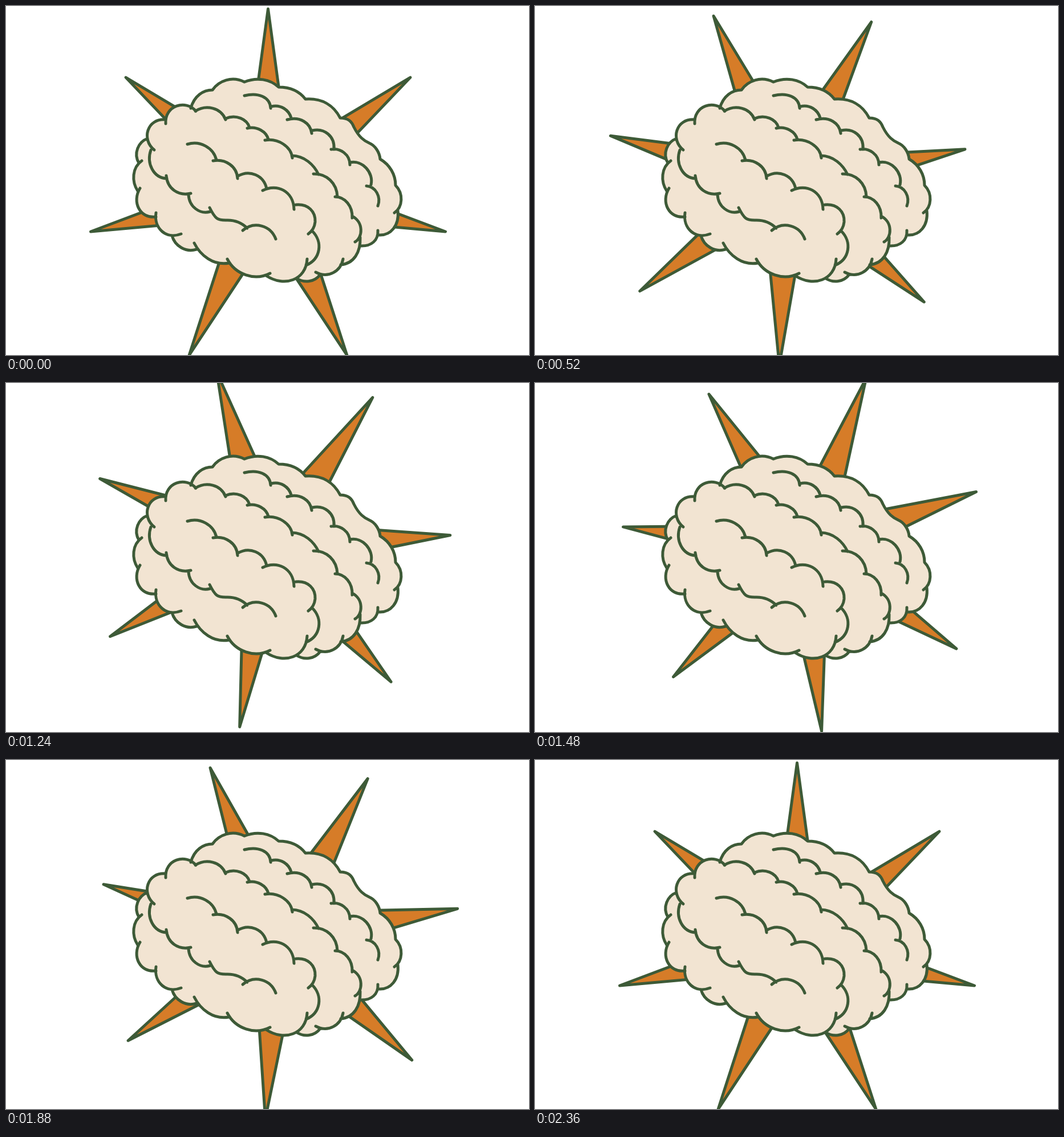
An HTML page with a canvas for the animation above (2.4 s loop, 917x611 px).

```html
<!DOCTYPE html>
<html lang="en">
<head>
<meta charset="utf-8">
<title>Brain with spinning star</title>
<style>
  html, body { margin: 0; width: 100%; height: 100%; overflow: hidden; background: #fff; }
  canvas { display: block; }
</style>
</head>
<body>
<canvas id="stage" width="917" height="611"></canvas>
<script>
const ctx = document.getElementById("stage").getContext("2d");
const WIDTH = 917, HEIGHT = 611;
const STEP = 40, STEPS = 60;
const GREEN = "#3d5a37", ORANGE = "#d67c28", CREAM = "#f2e4d2";

// The star's centre sits below the pivot, so it swings as it turns.
const PIVOT = { x: WIDTH / 2, y: HEIGHT / 2 };
const STAR = { x: 1, y: 18.5, points: 7, outer: 319, inner: 78 };

// Outer contour, clockwise; every M starts a new scallop.
const rightContour = `
  M324 179 C330 157 346 147 362 147 C373 131 396 122 418 133
  C440 124 463 128 478 142 C499 142 515 150 525 163
  C553 161 574 173 586 196 C600 196 606 202 610 212
  C619 230 628 236 637 240 C647 244 655 256 656 268
  C673 278 683 295 683 314 C697 328 696 352 681 362
  M687 358 C690 385 674 402 654 401
  M652 393 C653 410 641 421 621 420
  M621 405 C622 431 610 451 587 453
  M591 443 C587 464 565 478 543 466
  M551 470 C541 484 522 485 510 477`;
const leftContour = `
  M528 443 C526 480 488 493 456 472
  M463 468 C436 482 402 470 388 443
  M391 450 C364 455 341 437 330 415
  M334 426 C315 432 296 420 291 402
  M307 399 C281 409 259 390 263 362
  M263 369 C235 373 220 343 235 319
  M231 324 C220 307 221 283 238 271
  M233 275 C223 258 232 238 248 232
  M260 252 C237 234 247 196 280 199
  M280 206 C278 174 315 163 333 184`;

const folds = [
  `M418 157 C442 151 463 159 464 179
   M465 176 C482 172 496 182 500 196
   M493 199 C516 193 534 205 536 223
   M537 218 C558 213 577 228 575 251
   M570 251 C586 248 603 260 603 278
   M603 274 C625 269 645 292 640 313
   M632 315 C648 316 658 334 652 350`,
  `M332 184 C351 172 377 178 385 199
   M385 197 C403 189 423 198 427 213
   M423 214 C440 210 457 220 460 234
   M454 235 C477 231 500 246 502 266
   M501 262 C523 262 540 278 548 295
   M539 294 C562 293 580 310 581 334
   M577 334 C594 334 608 350 607 371
   M607 368 C627 378 626 405 612 413`,
  `M318 242 C340 235 364 248 369 270
   M363 271 C385 267 405 281 406 302
   M406 298 C427 286 452 296 457 320
   M450 323 C475 310 504 324 505 356
   M508 348 C530 346 543 360 542 378 C541 388 537 394 530 399
   M537 394 C556 413 552 443 526 454`,
  `M254 252 C246 275 258 301 282 302
   M281 297 C283 320 302 333 324 328
   M320 330 C321 352 340 365 358 360
   M357 353 C367 373 371 375 385 375 C403 374 414 380 423 389
   M415 393 C435 376 464 384 473 408`
];

const contour = rightContour + leftContour;
const brainShape = new Path2D(contour.trim().replace(/(?!^)M/g, "L") + "Z");
const brainLines = new Path2D(contour + folds.join(" "));
const starShape = makeStar(STAR);

function makeStar({ x, y, points, outer, inner }) {
  const path = new Path2D();
  for (let i = 0; i < points * 2; i++) {
    const angle = i * Math.PI / points;
    const radius = i % 2 ? inner : outer;
    path.lineTo(x + radius * Math.sin(angle), y - radius * Math.cos(angle));
  }
  path.closePath();
  return path;
}

function draw(now) {
  const step = Math.floor(now / STEP) % STEPS;
  ctx.fillStyle = "#fff";
  ctx.fillRect(0, 0, WIDTH, HEIGHT);
  ctx.strokeStyle = GREEN;
  ctx.lineWidth = 5;
  ctx.lineCap = ctx.lineJoin = "round";

  ctx.save();
  ctx.translate(PIVOT.x, PIVOT.y);
  ctx.rotate(step / (STEPS - 1) * 2 * Math.PI);
  ctx.fillStyle = ORANGE;
  ctx.fill(starShape);
  ctx.stroke(starShape);
  ctx.restore();

  ctx.fillStyle = CREAM;
  ctx.fill(brainShape);
  ctx.stroke(brainLines);
}

function tick() {
  draw(performance.now());
  requestAnimationFrame(tick);
}
tick();
</script>
</body>
</html>
```
